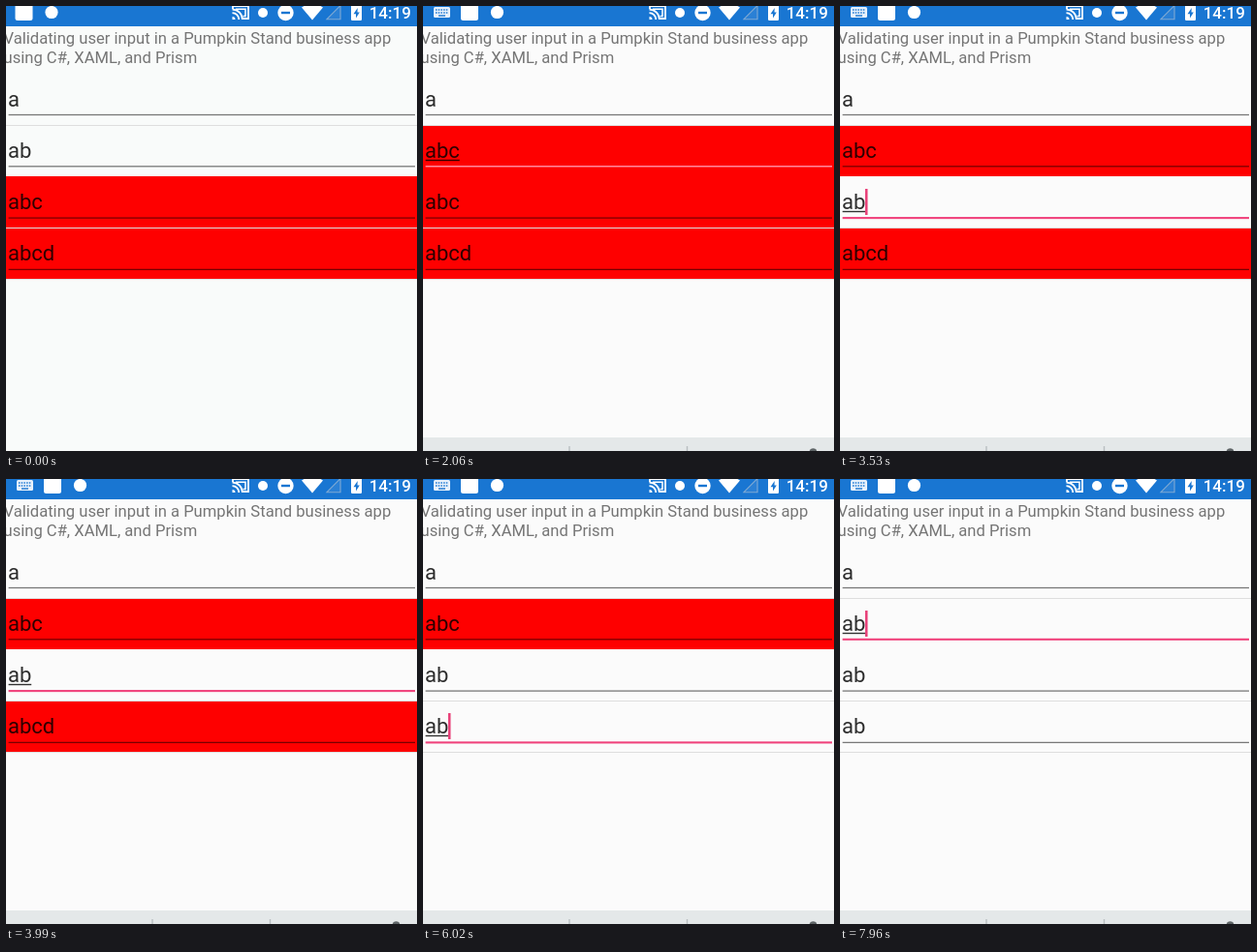
Write an HTML page that moves like this. It is 424 by 460 pixels and loops after 8000 ms.

```html
<!DOCTYPE html>
<html lang="en">
<head>
<meta charset="utf-8">
<title>Entry validation</title>
<style>
  html, body { margin: 0; width: 100%; height: 100%; overflow: hidden; background: #fbfbfb; }
  svg { display: block; width: 100vw; height: 100vh; }
  text { font-family: Roboto, "Open Sans", sans-serif; white-space: pre; }
  .title { font-size: 16.6px; fill: #757575; }
  .entry { font-size: 22px; fill: #000; fill-opacity: .82; }
  .clock { font-size: 17px; font-weight: 500; fill: #fff; }
</style>
</head>
<body>
<svg viewBox="0 0 424 460" xmlns="http://www.w3.org/2000/svg">
  <rect id="page" width="424" height="460"/>
  <text class="title" x="-2.5" y="39">Validating user input in a Pumpkin Stand business app</text>
  <text class="title" x="-2.5" y="58.5">using C#, XAML, and Prism</text>
  <g id="rows"></g>
  <path id="handle" fill="#ff4081" d="M0 0L8.5 8.5A12 12 0 1 1 -8.5 8.5Z"/>

  <rect width="424" height="21" fill="#1976d2"/>
  <g id="keyIcon">
    <rect x="11" y="1" width="17" height="11" rx="1.5" fill="#fff" fill-opacity=".9"/>
    <path d="M13 4H26M13 7H26" stroke="#1976d2" stroke-width="1.5" stroke-dasharray="1.5 1.2"/>
    <path d="M16 10H23" stroke="#1976d2" stroke-width="1.4"/>
  </g>
  <g id="notices" fill="#fff">
    <rect x="9.5" y="-4" width="18" height="19" rx="2.5"/>
    <circle cx="47" cy="6.5" r="6.6"/>
  </g>
  <g fill="none" stroke="#fff" stroke-width="1.8">
    <path d="M234 3V0H250V13H244"/>
    <path d="M233.5 7.2A6.8 6.8 0 0 1 240.3 14M233.5 3.6A10.4 10.4 0 0 1 243.9 14"/>
    <path d="M237 3.2H247V10.4H244.5" stroke-width="1.5"/>
  </g>
  <path d="M233.5 14V11A3 3 0 0 1 236.5 14Z" fill="#fff"/>
  <circle cx="265" cy="7" r="5" fill="#fff"/>
  <circle cx="288.5" cy="7" r="8.2" fill="#fff"/>
  <rect x="284" y="5.8" width="9" height="2.4" fill="#1976d2"/>
  <path d="M305 1.5Q316 -6 327 1.5L316 14.5Z" fill="#fff"/>
  <path d="M331 13.7L345 -.5V13.7Z" fill="#fff" fill-opacity=".08" stroke="#7fa9d4" stroke-width="1.1"/>
  <rect x="356" y="-1" width="11" height="16" rx="1.2" fill="#fff"/>
  <path d="M362.7 2L358.5 8.3H361V12.5L364.8 6.4H362.5Z" fill="#1976d2"/>
  <text class="clock" x="374.7" y="13">14:19</text>

  <g id="keyboard">
    <rect y="446" width="424" height="14" fill="#e4e8e9"/>
    <path d="M151 455V460M272.5 455V460" stroke="#b9bfc1" stroke-width="1.4"/>
    <circle cx="402.5" cy="461" r="3.8" fill="#5f6567"/>
  </g>
</svg>
<script>
const LOOP = 8000, BLINK = 460, MAX_LENGTH = 2;
const LEFT = 2.6, RIGHT = 422, ROW = 53, PITCH = 53.3, FIRST_EDGE = 70;
const START = ['a', 'ab', 'abc', 'abcd'];
const ACTIONS = [
  { at: 500,  tap: 1 },
  { at: 1510, type: 'c' },
  { at: 2520, tap: 2 },
  { at: 3530, erase: 1 },
  { at: 4540, tap: 3 },
  { at: 5470, erase: 1 },
  { at: 6020, erase: 1 },
  { at: 7030, tap: 1 },
  { at: 7960, erase: 1 }
];

const $ = id => document.getElementById(id);
const pen = document.createElement('canvas').getContext('2d');
pen.font = '22px Roboto, "Open Sans", sans-serif';

const rect = (x, y, w, h, fill, alpha = 1) =>
  `<rect x="${x}" y="${y}" width="${w}" height="${h}" fill="${fill}" fill-opacity="${alpha}"/>`;
const line = (y, h, fill, alpha) => rect(LEFT, y - h / 2, RIGHT - LEFT, h, fill, alpha);
const caretX = text => LEFT - .2 + pen.measureText(text).width;
const invalid = text => text.length > MAX_LENGTH;

// Replays every action up to time t.
function stateAt(t) {
  const s = { texts: [...START], focus: -1, caret: false, handle: false, grew: false };
  for (const { at, tap, type, erase } of ACTIONS) {
    if (at > t) break;
    s.focus = tap ?? s.focus;
    s.handle = tap !== undefined;
    s.grew = type !== undefined;
    if (type) s.texts[s.focus] += type;
    if (erase) s.texts[s.focus] = s.texts[s.focus].slice(0, -erase);
    s.caret = Math.floor((t - at) / BLINK) % 2 === 0;
  }
  return s;
}

function drawEntry(text, i, s) {
  const base = 104 + i * ROW, lineY = 112.5 + i * PITCH;
  const label = `<text class="entry" x="${LEFT - .6}" y="${base}">${text}</text>`;
  if (i !== s.focus) return line(lineY, 1.3, '#000', .52) + label;

  const x = caretX(text);
  return (s.grew ? line(lineY, 1.3, '#ff9fb8') : line(lineY, 2.1, '#f0437c')) + label +
    rect(LEFT, base + 1.8, x - LEFT - .5, 1.4, '#000', .8) +
    (s.caret ? rect(x - .8, base - 21, 2.6, 27, '#e8427a') : '');
}

function drawRows(s) {
  const edge = i => FIRST_EDGE + i * ROW;
  const bands = s.texts.map((text, i) =>
    invalid(text) ? rect(0, edge(i), 424, ROW, '#fe0000') : '');
  const dividers = [1, 3, 4].map(i => rect(0, edge(i), 424, 1, '#dedede'));
  const entries = s.texts.map((text, i) => drawEntry(text, i, s));
  return [...bands, ...dividers, ...entries].join('');
}

function show(s) {
  const editing = s.focus >= 0;
  $('page').setAttribute('fill', editing ? '#fbfbfb' : '#f9fbfa');
  $('rows').innerHTML = drawRows(s);
  $('keyIcon').style.display = $('keyboard').style.display = editing ? '' : 'none';
  $('notices').setAttribute('transform', `translate(${editing ? 29.5 : 0} 0)`);
  $('handle').style.display = s.handle ? '' : 'none';
  if (s.handle) {
    const x = caretX(s.texts[s.focus]), y = 109 + s.focus * ROW;
    $('handle').setAttribute('transform', `translate(${x} ${y})`);
  }
}

function tick() {
  show(stateAt(performance.now() % LOOP));
  requestAnimationFrame(tick);
}
tick();
</script>
</body>
</html>
```
